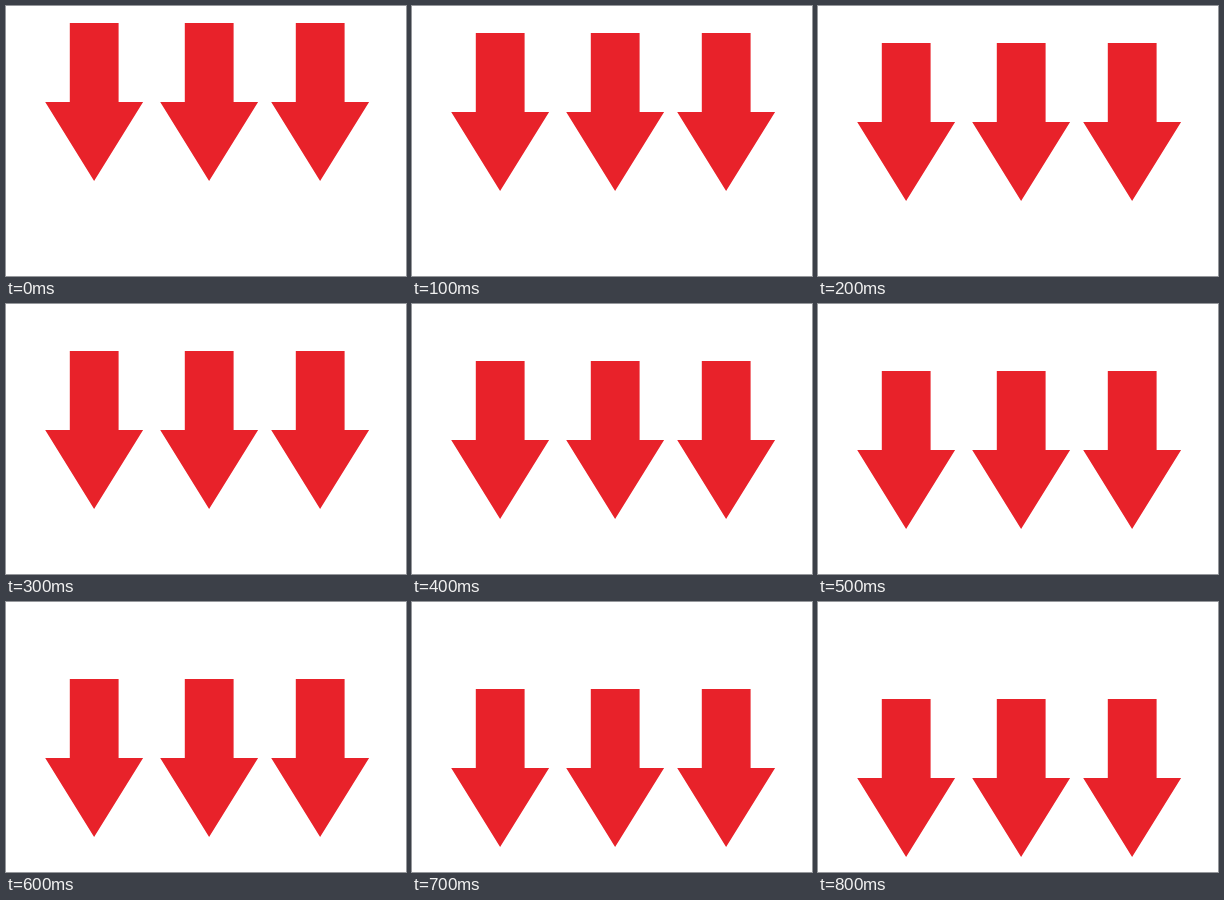
An HTML page for the animation above (900 ms loop, 400 by 270 pixels).

```html
<!DOCTYPE html>
<html lang="en">
<head>
<meta charset="utf-8">
<title>Falling arrows</title>
<style>
  html, body { margin: 0; width: 100%; height: 100%; overflow: hidden; background: #fff; }
  svg { display: block; width: 400px; height: 270px; }
  #arrows { fill: #e8222a; animation: fall 900ms steps(9, end) infinite; }
  @keyframes fall {
    from { transform: translateY(0); }
    to { transform: translateY(90px); }
  }
</style>
</head>
<body>
<svg viewBox="0 0 400 270">
  <defs>
    <path id="arrow" d="M-24.3 17H24.5V96H49L0 175L-48.9 96H-24.3Z"/>
  </defs>
  <g id="arrows">
    <use href="#arrow" x="88.1"/>
    <use href="#arrow" x="203.1"/>
    <use href="#arrow" x="314.1"/>
  </g>
</svg>
</body>
</html>
```
